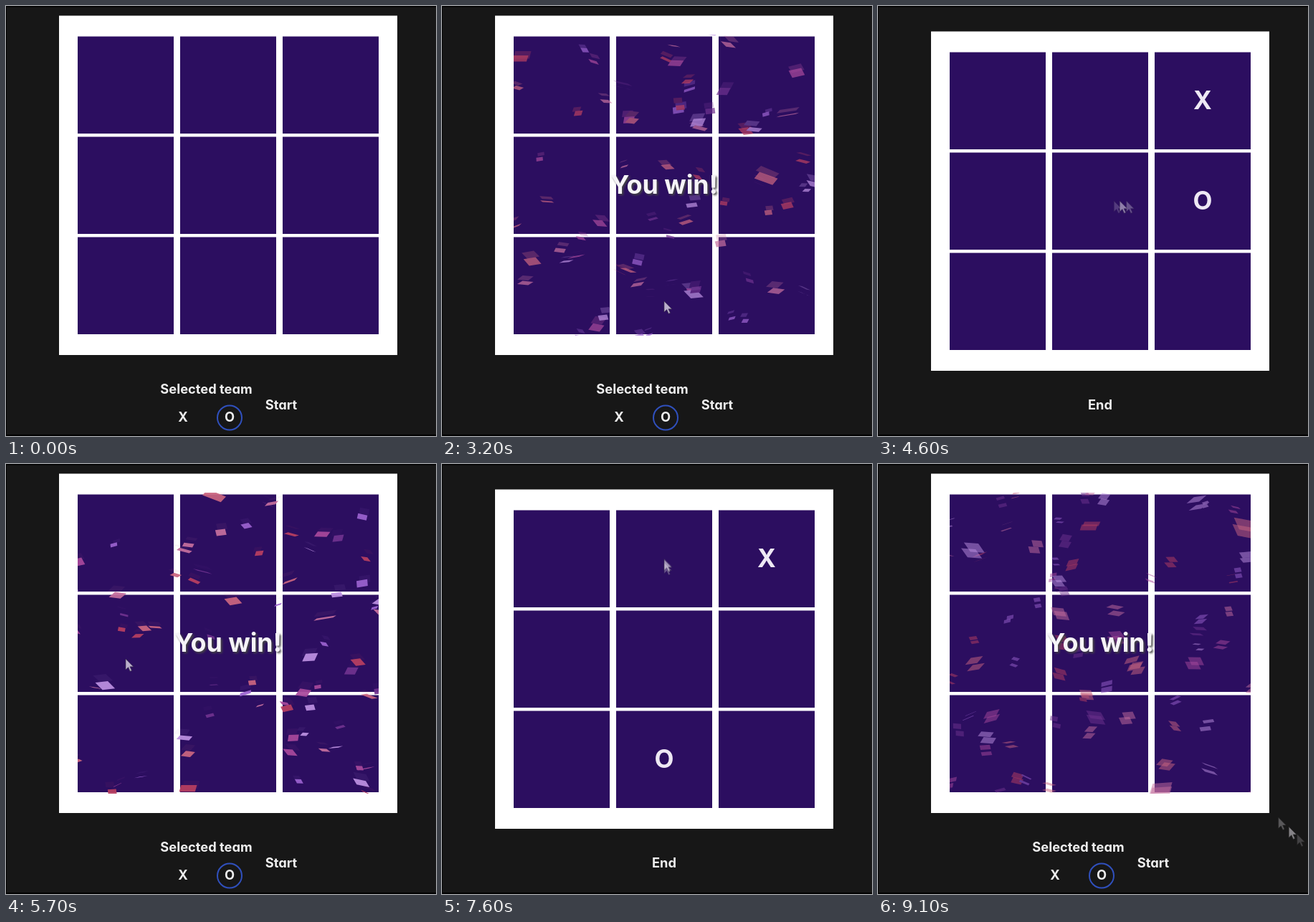
Recreate the animation shown at these times as an HTML page. Size 600 by 600 pixels, loop 9200 ms.

```html
<!DOCTYPE html>
<html>
<head>
<meta charset="utf-8">
<style>
  html, body { margin: 0; width: 100%; height: 100%; overflow: hidden; background: #000; }
  svg { display: block; width: 600px; height: 600px; }
  text { font: 700 18.3px Inter, "Open Sans", sans-serif; font-feature-settings: "cv11"; text-anchor: middle; fill: #eee; }
  #marks text { font-size: 35px; fill: #eee8f4; }
  #win { font-size: 35.8px; fill: #f6f4f8; filter: drop-shadow(2px 2px 1.5px #444); }
</style>
</head>
<body>
<svg viewBox="0 0 600 600">
  <defs>
    <clipPath id="area"><rect x="100" y="40" width="420" height="420"/></clipPath>
    <path id="arrow" d="M0 0V15L3.6 11.6L6.2 17.2L8.4 16.2L5.9 10.8H10.6Z" fill="#f2eef6" stroke="#444" stroke-width=".6"/>
    <path id="hand" d="M-2 1Q0-3 2 1V7Q4 5.500 5 8Q7 6.500 8 9Q10 8 10 10V15L8 19V22H-1V19L-6 12Q-5 9-2 12Z" fill="#fff" stroke="#222" stroke-width=".8"/>
  </defs>
  <rect x="1" y="1.500" width="599" height="596.500" fill="#171717"/>
  <g id="board">
    <rect x="74" y="13.500" width="472" height="473.500" fill="#fff"/>
    <g id="cells" fill="#2c0e60"></g>
    <g id="marks"></g>
  </g>
  <g id="confetti" clip-path="url(#area)"></g>
  <text id="win" x="310" y="262">You win!</text>
  <g id="menu">
    <text x="279.500" y="541">Selected team</text>
    <text x="384" y="563">Start</text>
    <text x="247" y="580">X</text>
    <circle cx="312" cy="574.500" r="17" fill="none" stroke="#3050bd" stroke-width="2"/>
    <text x="312" y="580">O</text>
  </g>
  <text id="end" x="310" y="563">End</text>
  <g id="cursor"></g>
</svg>
<script>
const LOOP = 9200, STEP = 100, BLEND = 33, WIN_TIME = 1050, DROP = 22;
const BUTTON = [388, 566];
const $ = id => document.getElementById(id);
const add = (parent, tag, attrs) => {
  const el = document.createElementNS('http://www.w3.org/2000/svg', tag);
  for (const k in attrs) el.setAttribute(k, attrs[k]);
  return parent.appendChild(el);
};
const show = (el, on) => el.style.display = on ? '' : 'none';
const place = (el, [x, y]) => el.setAttribute('transform', `translate(${x} ${y})`);
const center = cell => [167 + cell % 3 * 143, 110 + Math.floor(cell / 3) * 140];

for (let i = 0; i < 9; i++) {
  const [x, y] = center(i);
  add($('cells'), 'rect', { x: x - 67, y: y - 67.5, width: 134, height: 135.5 });
}

// Cells are listed in playing order: O and X alternate, the last move wins.
const games = [
  { start: 1100, end: 2700, cells: [4, 2, 1, 5, 7] },
  { start: 3800, end: 5300, cells: [5, 2, 4, 0, 3] },
  { start: 6600, end: 8150, cells: [7, 2, 1, 5, 4] }
];

// The pointer goes from the button to each O cell and back.
const stops = [{ t: 200, at: [500, 620] }];
for (const g of games) {
  stops.push({ t: g.start - 300, at: BUTTON }, { t: g.start, at: BUTTON });
  g.moves = g.cells.map((cell, i) => {
    const t = g.start + (g.end - g.start) * (i + 2) / 6;
    const [x, y] = center(cell);
    const el = add($('marks'), 'text', { x, y: y + 12 });
    el.textContent = 'OX'[i % 2];
    if (i % 2 === 0) stops.push({ t, at: [x, y + DROP] });
    return { t, el };
  });
  stops.push({ t: g.end + 600, at: stops[stops.length - 1].at });
}
stops.push({ t: LOOP + BLEND, at: [600, 530] });

function pointer(t) {
  const i = stops.findIndex(s => s.t >= t);
  if (i < 1) return [-50, -50];
  const a = stops[i - 1], b = stops[i];
  const k = Math.sin((t - a.t) / (b.t - a.t) * Math.PI / 2);
  return a.at.map((v, n) => v + (b.at[n] - v) * k);
}

let seed = 29;
const rnd = (lo, hi) => lo + (hi - lo) * (seed = seed * 16807 % 2147483647) / 2147483647;
const colors = ['#c56f9e', '#9b62cf', '#b83f61', '#bd91e2', '#a8499c', '#cb6680', '#6f328f'];
const flakes = Array.from({ length: 75 }, (_, i) => ({
  x: rnd(0, 440), y: rnd(0, 440), size: i % 17 ? rnd(4, 9) : rnd(10, 14),
  speed: rnd(.15, .32), drift: rnd(-.15, .15),
  slope: rnd(-.6, .6), skew: rnd(-.6, .6), tilt: rnd(0, 6.28),
  color: colors[i % colors.length]
}));
const layers = [BLEND, 0].map(delay => {
  const g = add($('confetti'), 'g', {});
  return { g, delay, paths: flakes.map(f => add(g, 'path', { fill: f.color })) };
});

const wrap = v => (v % 440 + 440) % 440;
function flakePath(f, t) {
  const x = 90 + wrap(f.x + f.drift * t), y = 30 + wrap(f.y + f.speed * t);
  const c = Math.cos(f.tilt + t * .005);
  const ux = f.size, uy = f.size * f.slope * (1 - Math.abs(c) * .7);
  const vx = f.size * f.skew, vy = f.size * .65 * c;
  const pt = (m, n) => `${x + m * ux + n * vx} ${y + m * uy + n * vy}`;
  return `M${pt(-1, -1)}L${pt(1, -1)}L${pt(1, 1)}L${pt(-1, 1)}Z`;
}

const ghosts = [[-BLEND, .3], [BLEND, .2], [0, .5]].map(([shift, opacity]) =>
  ({ shift, el: add($('cursor'), 'use', { href: '#arrow', opacity }) }));
const hand = add($('cursor'), 'use', { href: '#hand' });

function draw(t) {
  const playing = games.some(g => t >= g.start && t < g.end);
  const won = games.some(g => t >= g.end && t < g.end + WIN_TIME);
  place($('board'), [0, playing ? DROP : 0]);
  show($('menu'), !playing);
  show($('end'), playing);
  show($('win'), won);
  show($('confetti'), won);
  for (const g of games)
    for (const m of g.moves) show(m.el, t >= m.t && t < g.end);

  if (won) {
    const mix = t / STEP / 14 % 1;
    for (const { g, delay, paths } of layers) {
      g.setAttribute('opacity', delay ? mix : 1 - mix);
      paths.forEach((p, i) => p.setAttribute('d', flakePath(flakes[i], t - delay)));
    }
  }

  const at = pointer(t);
  const hover = !playing && Math.hypot(at[0] - BUTTON[0], at[1] - BUTTON[1]) < 20;
  show(hand, hover);
  place(hand, at);
  for (const { shift, el } of ghosts) {
    show(el, !hover);
    place(el, pointer(t + shift));
  }
}

const begin = performance.now();
function tick() {
  const t = (performance.now() - begin) % LOOP;
  draw(Math.floor(t / STEP) * STEP);
  requestAnimationFrame(tick);
}
tick();
</script>
</body>
</html>
```
